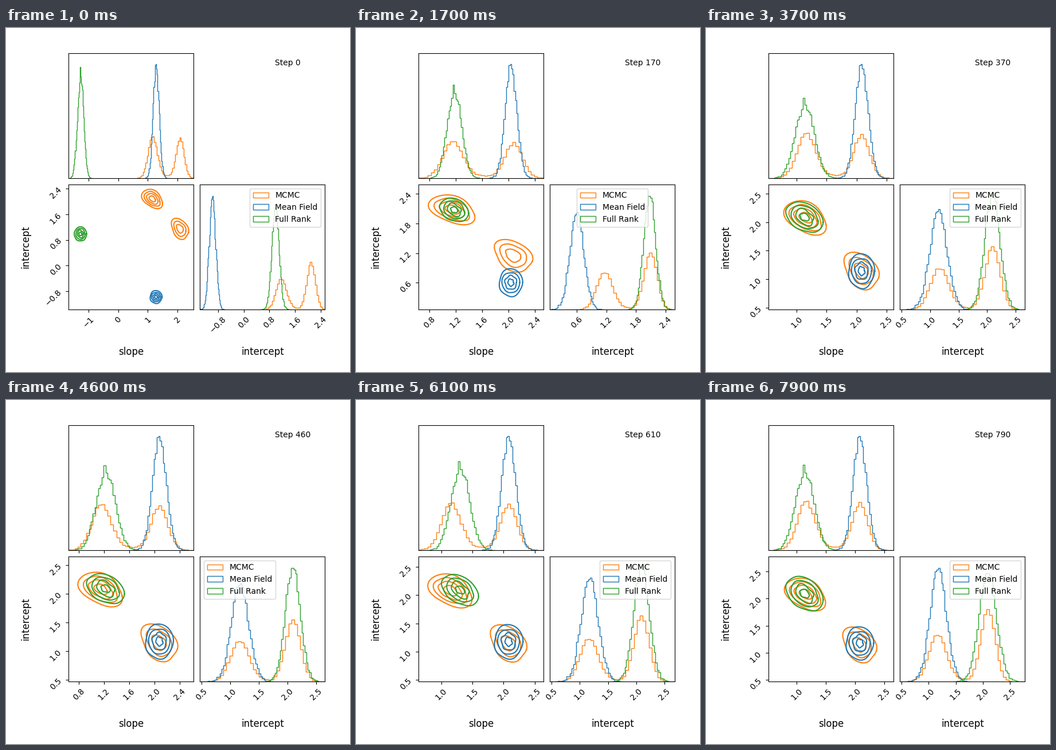
A matplotlib script for the animation above (8 s loop, 600 by 600 pixels).

```python
import matplotlib.pyplot as plt
import numpy as np
from matplotlib.animation import FuncAnimation
from matplotlib.patches import Patch
from matplotlib.ticker import MaxNLocator

FRAMES, INTERVAL, BINS = 80, 100, 40
LAST = 10 * (FRAMES - 1)
ORANGE, BLUE, GREEN = "#ff7f0e", "#1f77b4", "#2ca02c"
LEGEND = [(0, "upper right"), (80, "upper center"), (200, "upper left"),
          (300, "upper right"), (450, "upper left"), (600, "upper right")]
rng = np.random.default_rng(12)


def bell(x, mu=0.0, s=1.0):
    return np.exp(-0.5 * ((x - mu) / s) ** 2)


def settle(t, start, end, tau, power=1.5):
    """Leave start steadily, then ease into end."""
    f = np.exp(-(t / tau) ** power)
    return start * f + end * (1 - f)


def mean_field(t):
    """x, y, sx, sy, rho of the factorised fit at step t."""
    return (settle(t, 1.274, 2.08, 82),
            settle(t, -0.977, 1.175, 141),
            0.1 + 0.018 * t / LAST - 0.0167 * bell(t, 195, 60),
            settle(t, 0.1, 0.152, 130),
            0.0)


def full_rank(t):
    """x, y, sx, sy, rho of the correlated fit, which keeps wandering."""
    sway = 1.21 - 0.1 * np.cos(2 * np.pi * (t - 310) / 540)
    wide = 0.168 - 0.02 * bell(t, 450, 106) - 0.033 * bell(t, 690, 65)
    return (settle(t, -1.265, sway, 65),
            settle(t, 0.985, 2.09, 65),
            settle(t, 0.102, wide, 215, 10),
            0.112 + 0.048 * t / LAST - 0.031 * bell(t, 250, 35) - 0.017 * bell(t, 540, 70),
            settle(t, 0, -0.33, 110) + 0.25 * bell(t, 250, 40) - 0.15 * bell(t, 680, 55))


def binned(density, lo, hi, n=40000):
    """Histogram of a density with counting noise."""
    edges = np.linspace(lo, hi, BINS + 1)
    p = density((edges[:-1] + edges[1:]) / 2)
    noise = rng.normal(size=BINS) * np.sqrt(p / (n * (edges[1] - edges[0])))
    return np.maximum(p + noise, 0), edges


def unit_hist(lo, hi):
    p, edges = binned(lambda e: 0.4 * bell(e), lo, hi, 14000)
    return p * 0.405 / p.max(), edges


def ring(r, rough, lobe=0.0, turn=0.0):
    """Uneven circle, optionally pulled towards three corners."""
    th = np.linspace(0, 2 * np.pi, 41)
    wave = 1 + lobe * np.cos(3 * (th - turn))
    for k in range(2, 7):
        wave = wave + rng.normal(0, rough) * np.cos(k * th + rng.uniform(0, 2 * np.pi))
    return r * wave * np.cos(th), r * wave * np.sin(th)


def place(uv, x, y, sx, sy, rho):
    """Map a unit contour to a correlated Gaussian."""
    u, v = uv
    return x + sx * u, y + sy * (rho * u + np.sqrt(1 - rho ** 2) * v)


MCMC_X, MCMC_Y = (0.638, 2.537), (0.47, 2.53)
mcmc_hists = [
    binned(lambda x: 1.48 * bell(x, 1.16, 0.154) + 1.42 * bell(x, 2.08, 0.134)
           + 0.08 * bell(x, 1.65, 0.18), *MCMC_X),
    binned(lambda y: 1.10 * bell(y, 1.16, 0.160) + 1.69 * bell(y, 2.09, 0.133)
           + 0.04 * bell(y, 1.60, 0.18), *MCMC_Y),
]
# Per posterior mode: x, y, sx, sy, rho; corner direction; contour radii
MODES = [((1.15, 2.08, 0.35, 0.30, -0.40), -0.71, (1, 0.76, 0.54, 0.30)),
         ((2.075, 1.15, 0.285, 0.33, -0.35), 2.56, (1, 0.71, 0.40))]
FITS = [(mean_field, BLUE, unit_hist(-3.9, 4.93), unit_hist(-3.88, 3.9)),
        (full_rank, GREEN, unit_hist(-3.92, 3.9), unit_hist(-4.0, 4.3))]

fig, axes = plt.subplots(2, 2, figsize=(6, 6), dpi=100)
fig.subplots_adjust(left=1 / 5.5, bottom=1 / 5.5, right=5.1 / 5.5, top=5.1 / 5.5,
                    wspace=0.05, hspace=0.05)
(ax_x, ax_note), (ax_xy, ax_y) = axes
ax_note.axis("off")
note = ax_note.text(0.6, 0.9, "", transform=ax_note.transAxes, fontsize=10)

for ax in (ax_x, ax_y, ax_xy):
    ax.xaxis.set_major_locator(MaxNLocator(5, prune="lower"))
    ax.tick_params(labelrotation=45)
ax_xy.yaxis.set_major_locator(MaxNLocator(5, prune="lower"))
ax_x.tick_params(labelbottom=False)
for ax in (ax_x, ax_y):
    ax.set_yticks([])
for ax, name in ((ax_xy, "slope"), (ax_y, "intercept")):
    ax.set_xlabel(name, fontsize=12)
    ax.xaxis.set_label_coords(0.5, -0.3)
ax_xy.set_ylabel("intercept", fontsize=12)
ax_xy.yaxis.set_label_coords(-0.3, 0.5)

for ax, (p, edges) in zip((ax_x, ax_y), mcmc_hists):
    ax.stairs(p, edges, color=ORANGE, lw=1)
for shape, turn, radii in MODES:
    for r in radii:
        ax_xy.plot(*place(ring(r, 0.012, 0.06, turn), *shape), color=ORANGE, lw=1.5)

fits = []
for state, colour, hx, hy in FITS:
    steps = [(ax.stairs(*h, color=colour, lw=1), *h) for ax, h in ((ax_x, hx), (ax_y, hy))]
    rings = [(ax_xy.plot([], [], color=colour, lw=1.5)[0], ring(r, 0.03 / np.sqrt(r)))
             for r in (0.5, 1.0, 1.5, 2.0)]
    fits.append((state, steps, rings))

legend = ax_y.legend(
    [Patch(fill=False, edgecolor=c, lw=1) for c in (ORANGE, BLUE, GREEN)],
    ["MCMC", "Mean Field", "Full Rank"], loc="upper right", fontsize=10)


def update(i):
    t = 10 * i
    lims = [MCMC_X, MCMC_Y]
    tops = [p.max() for p, _ in mcmc_hists]
    for state, steps, rings in fits:
        x, y, sx, sy, rho = state(t)
        for k, (mu, s) in enumerate(((x, sx), (y, sy))):
            stairs, p, e = steps[k]
            edges = mu + s * e
            stairs.set_data(p / s, edges)
            lims[k] = min(lims[k][0], edges[0]), max(lims[k][1], edges[-1])
            tops[k] = max(tops[k], p.max() / s)
        for line, uv in rings:
            line.set_data(*place(uv, x, y, sx, sy, rho))
    ax_x.set(xlim=lims[0], ylim=(0, 1.1 * tops[0]))
    ax_y.set(xlim=lims[1], ylim=(0, 1.1 * tops[1]))
    ax_xy.set(xlim=lims[0], ylim=lims[1])
    legend.set_loc([loc for start, loc in LEGEND if t >= start][-1])
    note.set_text(f"Step {t}")
    return []


anim = FuncAnimation(fig, update, frames=FRAMES, interval=INTERVAL, repeat=True, blit=False)
plt.show()
```
